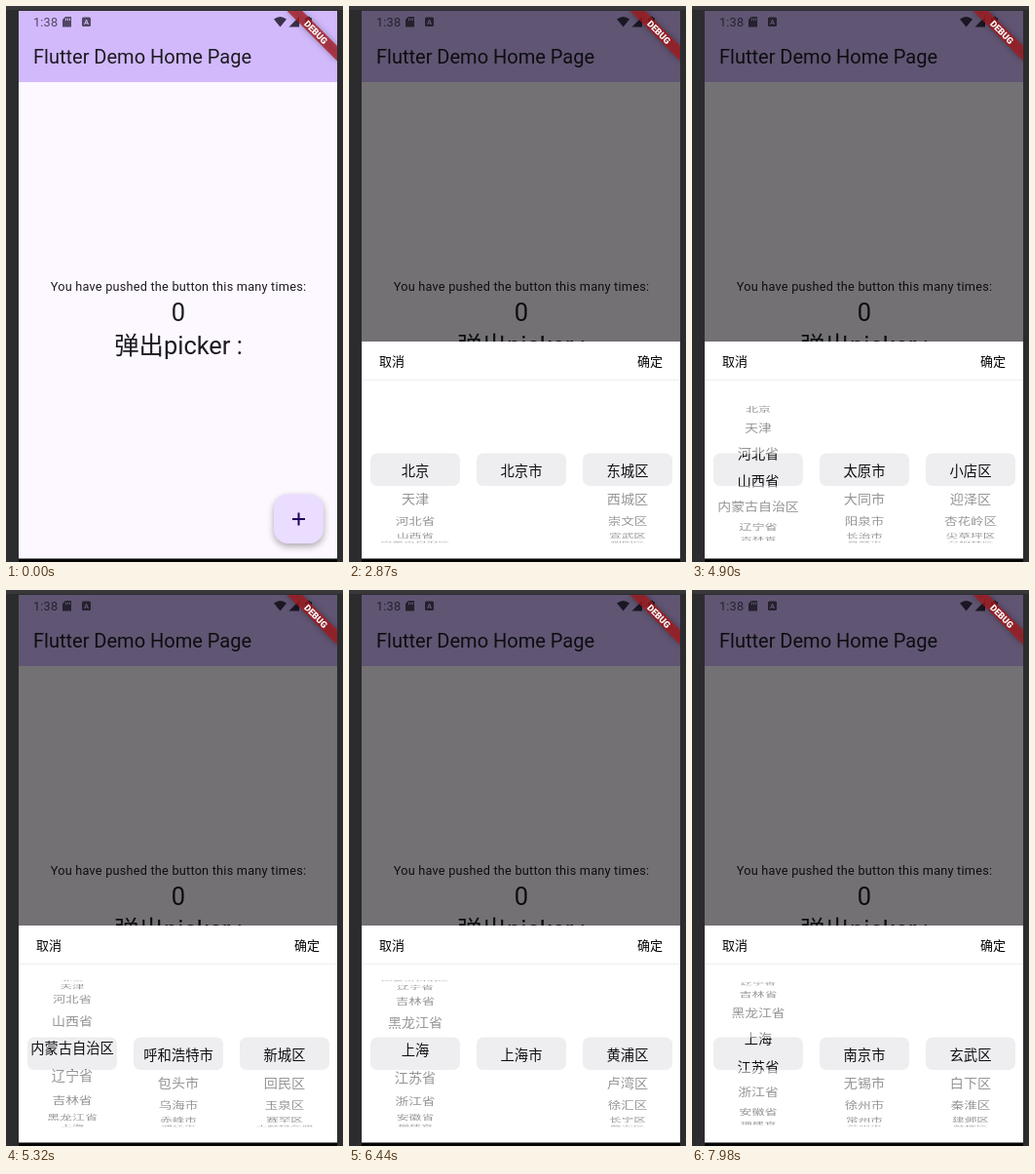
Recreate the animation shown at these times as an HTML page with a canvas. Size 346 by 570 pixels, loop 8 s.

```html
<!DOCTYPE html>
<html lang="zh-CN">
<head>
<meta charset="utf-8">
<style>
html, body { margin: 0; width: 346px; height: 570px; overflow: hidden; background: #2c2c2e; }
canvas { display: block; }
</style>
</head>
<body>
<canvas id="stage" width="346" height="570"></canvas>
<script>
const ctx = document.getElementById('stage').getContext('2d');
const LOOP = 8000, STEP = 70, OPEN_AT = 2870;
const LATIN = 'Roboto, "Noto Sans CJK SC", sans-serif';
const CJK = '"Noto Sans CJK SC", "Noto Sans CJK", sans-serif';
const INK = '#1d1b20';

// province | cities | districts of the first city
const REGIONS = [
  '北京|北京市|东城区 西城区 崇文区 宣武区 朝阳区',
  '天津|天津市|和平区 河东区 河西区 南开区 河北区',
  '河北省|石家庄市 唐山市 秦皇岛市 邯郸市 邢台市|长安区 桥东区 桥西区 新华区 井陉矿区',
  '山西省|太原市 大同市 阳泉市 长治市 晋城市|小店区 迎泽区 杏花岭区 尖草坪区 万柏林区',
  '内蒙古自治区|呼和浩特市 包头市 乌海市 赤峰市 通辽市|新城区 回民区 玉泉区 赛罕区 土默特左旗',
  '辽宁省|沈阳市 大连市 鞍山市 抚顺市 本溪市|和平区 沈河区 大东区 皇姑区 铁西区',
  '吉林省|长春市 吉林市 四平市 辽源市 通化市|南关区 宽城区 朝阳区 二道区 绿园区',
  '黑龙江省|哈尔滨市 齐齐哈尔市 鸡西市 鹤岗市 双鸭山市|道里区 南岗区 道外区 香坊区 动力区',
  '上海|上海市|黄浦区 卢湾区 徐汇区 长宁区 静安区',
  '江苏省|南京市 无锡市 徐州市 常州市 苏州市|玄武区 白下区 秦淮区 建邺区 鼓楼区',
  '浙江省||', '安徽省||', '福建省||', '江西省||'
].map(row => {
  const [name, cities, districts] = row.split('|');
  return { name, cities: cities.split(' '), districts: districts.split(' ') };
});
const PROVINCES = REGIONS.map(r => r.name);

// [time, wheel position in items]
const SCROLL = [
  [4690, 0], [4760, 0.6], [4830, 1.7], [4900, 2.64], [4970, 3.2], [5040, 3.6],
  [5110, 3.9], [5180, 4.1], [5320, 4.25], [5390, 4.18], [5460, 4.1], [5530, 4.05],
  [5670, 4], [6160, 4], [6230, 4.7], [6300, 5.9], [6370, 7.2], [6440, 8.19],
  [6650, 8.19], [6720, 8.16], [6860, 8.08], [7000, 8.03], [7140, 8],
  [7840, 8], [7910, 8.2], [7980, 8.59]
];

function scrollAt(t) {
  const i = SCROLL.findIndex(k => k[0] > t);
  if (i === 0) return 0;
  if (i < 0) return SCROLL[SCROLL.length - 1][1];
  const [t0, p0] = SCROLL[i - 1], [t1, p1] = SCROLL[i];
  return p0 + (p1 - p0) * (t - t0) / (t1 - t0);
}

function rect(x, y, w, h, color) {
  ctx.fillStyle = color;
  ctx.fillRect(x, y, w, h);
}

function roundRect(x, y, w, h, r, color) {
  ctx.fillStyle = color;
  ctx.beginPath();
  ctx.roundRect(x, y, w, h, r);
  ctx.fill();
}

function polygon(points, color) {
  ctx.fillStyle = color;
  ctx.beginPath();
  points.forEach(p => ctx.lineTo(...p));
  ctx.fill();
}

function text(str, x, y, font, color, align = 'left', spacing = 0) {
  ctx.font = font;
  ctx.fillStyle = color;
  ctx.textAlign = align;
  ctx.letterSpacing = spacing + 'px';
  ctx.fillText(str, x, y);
}

function clipped(x, y, w, h, paint) {
  ctx.save();
  ctx.beginPath();
  ctx.rect(x, y, w, h);
  ctx.clip();
  paint();
  ctx.restore();
}

function drawStatusBar() {
  const soft = '#514763', dark = '#39324a';
  text('1:38', 28, 20.5, '12.7px ' + LATIN, soft, 'left', 0.2);
  polygon([[61, 11], [67, 11], [67, 21.5], [58, 21.5], [58, 14]], soft);
  for (const x of [61, 63, 65]) rect(x, 12.5, 1, 2.5, '#d0b9fb');
  roundRect(78, 11.5, 9, 9.5, 1.5, soft);
  text('A', 82.5, 19, 'bold 7.5px ' + LATIN, '#d0b9fb', 'center');
  ctx.fillStyle = dark;
  ctx.beginPath();
  ctx.moveTo(281.5, 21.5);
  ctx.lineTo(275, 13.5);
  ctx.quadraticCurveTo(281.5, 8.5, 288, 13.5);
  ctx.fill();
  polygon([[301, 11], [301, 21.5], [290.5, 21.5]], dark);
  roundRect(307, 12, 7, 10, 1, dark);
  rect(309, 10.8, 3, 2, dark);
}

function drawHome() {
  rect(13, 5, 327, 562, '#fdf7ff');
  rect(13, 5, 327, 73, '#d1b9fc');
  drawStatusBar();
  text('Flutter Demo Home Page', 28, 59, '20px ' + LATIN, INK);
  text('You have pushed the button this many times:', 177, 292.3, '12.7px ' + LATIN, INK, 'center', 0.23);
  text('0', 177, 323, '25.4px ' + LATIN, INK, 'center');
  text('弹出picker :', 177, 357.3, '25.4px ' + LATIN, INK, 'center');

  ctx.save();
  ctx.shadowColor = 'rgba(0,0,0,.32)';
  ctx.shadowBlur = 7;
  ctx.shadowOffsetY = 3;
  roundRect(275, 500.5, 51, 50.5, 14.5, '#eaddff');
  ctx.restore();
  rect(294, 525, 13, 2, '#21005d');
  rect(299.5, 519.5, 2, 13, '#21005d');
}

function drawBanner() {
  const s = 0.908;
  ctx.save();
  ctx.translate(340, 5);
  ctx.rotate(Math.PI / 4);
  ctx.scale(s, s);
  ctx.shadowColor = 'rgba(0,0,0,.5)';
  ctx.shadowBlur = 6;
  rect(-40, 28, 80, 12, 'rgba(183,28,28,.63)');
  ctx.shadowColor = 'transparent';
  rect(-40, 28, 80, 12, 'rgba(150,24,34,.35)');
  text('DEBUG', 0, 37.6, '900 10.2px ' + LATIN, '#fff', 'center');
  ctx.restore();
}

// Labels on a cylinder seen in perspective.
function drawWheel(items, cx, position) {
  const R = 96.5, DEPTH = 0.33, ANGLE = 0.3, CENTER = 475.5;
  items.forEach((label, i) => {
    const a = (i - position) * ANGLE;
    if (Math.abs(a) > 1.28) return;
    const sin = Math.sin(a), cos = Math.cos(a);
    const w = 1 + DEPTH * (1 - cos);
    const scaleY = Math.max(0.05, cos / w - DEPTH * sin * sin / (w * w));
    ctx.save();
    ctx.translate(cx, CENTER + R * sin / w);
    ctx.scale(1 / w, scaleY);
    text(label, 0, 6.6, '14.3px ' + CJK, '#101012', 'center');
    ctx.restore();
  });
}

function drawPicker(position) {
  rect(13, 5, 327, 562, 'rgba(0,0,0,.54)');
  rect(13, 344, 327, 223, '#fff');
  rect(13, 383, 327, 1, '#efefef');
  text('取消', 31, 369, '13px ' + CJK, '#000');
  text('确定', 322, 369, '13px ' + CJK, '#000', 'right');

  const region = REGIONS[Math.round(position)];
  const columns = [[PROVINCES, 68, position], [region.cities, 177, 0], [region.districts, 286, 0]];
  for (const [, cx] of columns) roundRect(cx - 46, 458.5, 92, 33.5, 7, '#eeeef0');
  const wheels = () => columns.forEach(c => drawWheel(...c));
  const faded = () => { ctx.globalAlpha = 0.447; wheels(); };
  clipped(13, 384, 327, 75, faded);
  clipped(13, 459, 327, 33, wheels);
  clipped(13, 492, 327, 74, faded);
}

function draw(t) {
  rect(0, 0, 346, 570, '#2c2c2e');
  rect(0, 0, 346, 4, '#38383a');
  clipped(13, 5, 327, 562, () => {
    drawHome();
    if (t >= OPEN_AT) drawPicker(scrollAt(t));
    drawBanner();
  });
  rect(13, 566.5, 327, 3.5, '#050505');
}

const start = performance.now();
function tick() {
  const t = (performance.now() - start) % LOOP;
  draw(Math.floor(t / STEP) * STEP);
  requestAnimationFrame(tick);
}
tick();
</script>
</body>
</html>
```
